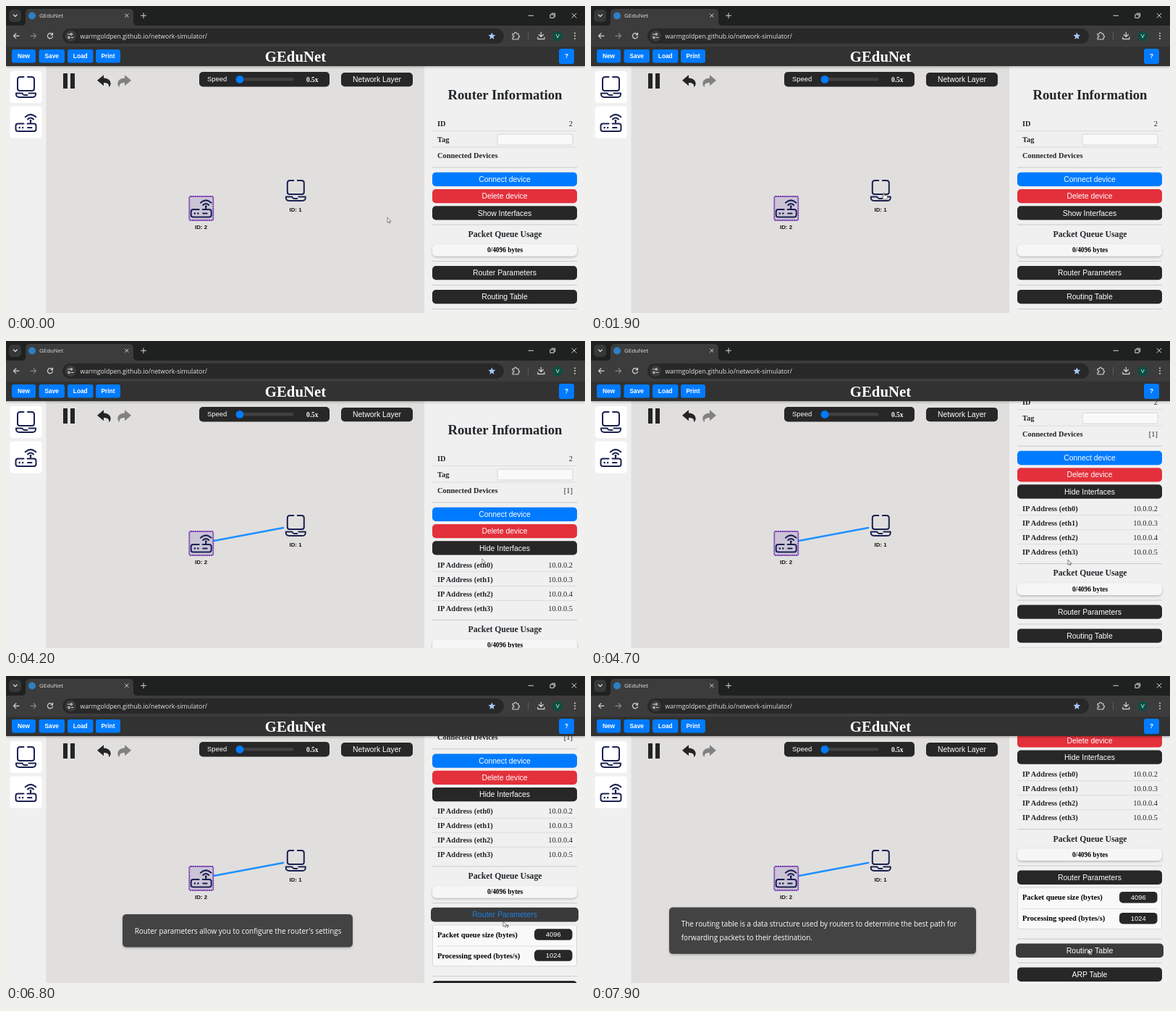
Animation of 800x424 px, one loop 8000 ms. Source, as an HTML page:

```html
<!DOCTYPE html>
<html lang="en">
<head>
<meta charset="utf-8">
<title>GEduNet</title>
<style>
  html, body { margin: 0; width: 100%; height: 100%; overflow: hidden; background: #e0dfde; }
  svg { display: block; width: 800px; height: 424px; }
  text { font-family: "Liberation Sans", Arial, sans-serif; }
  .serif { font-family: "Liberation Serif", "Times New Roman", serif; }
  .ui { font-family: "Open Sans", "Noto Sans", sans-serif; }
  .bold { font-weight: bold; }
  .line { fill: none; stroke-linecap: round; stroke-linejoin: round; }
  .btn { transform-box: fill-box; transform-origin: center; }
  .btn.hover { transform: scale(1.02); }
  .btn.hover rect { fill: #3a3a3a; }
  .blue text, text.blue { fill: #1e80e0; }
  #connect.hover { transform: none; }
  #connect.hover rect { fill: #006ae0; }
</style>
</head>
<body>
<svg id="stage" viewBox="0 0 800 424"></svg>
<script>
const DARK = '#272727', BLUE = '#007bff', NAVY = '#1a2150', INK = '#212529';
const LOOP = 8000;

const rect = (x, y, w, h, r, fill, extra = '') =>
  `<rect x="${x}" y="${y}" width="${w}" height="${h}" rx="${r}" fill="${fill}" ${extra}/>`;
const text = (x, y, s, size, fill = INK, cls = '', anchor = 'start', extra = '') =>
  `<text x="${x}" y="${y}" font-size="${size}" fill="${fill}" class="${cls}" text-anchor="${anchor}" ${extra}>${s}</text>`;
const line = (d, color, width = 1.2, extra = '') =>
  `<path class="line" d="${d}" stroke="${color}" stroke-width="${width}" ${extra}/>`;
const group = (id, content, extra = '') => `<g id="${id}" ${extra}>${content}</g>`;
const use = (id, x, y) => `<use href="#${id}" x="${x}" y="${y}"/>`;
const hr = (y, color = '#cbcbcb') => rect(589, y, 200, 1, 0, color);
const button = (id, y, label, fill = DARK) => group(id,
  rect(589, y, 200, 19.3, 5, fill) + text(689, y + 13.3, label, 10.42, '#fff', '', 'middle'), 'class="btn"');
const row = (y, key, value, id = '') =>
  text(596, y, key, 10.42, INK, 'serif bold', 'start', id && `id="${id}"`) +
  text(783, y, value, 10.42, INK, 'serif', 'end');

const defs = `<defs>
  <filter id="shadow" x="-10%" y="-30%" width="120%" height="180%">
    <feDropShadow dx="0" dy="1.5" stdDeviation="1.5" flood-opacity=".25"/></filter>
  <g id="laptop">${line('M-3 -14H-8Q-11.5 -14 -11.5 -10.5V2Q-11.5 5 -8.5 5H8.5Q11.5 5 11.5 2V-10.5Q11.5 -14 8 -14H2.5', NAVY, 2)
    + line('M4 8.5H13.5Q14 14 9 14H-9Q-14 14 -13.5 8.5H-5Q-4 11 -1.5 11H2', NAVY, 2)}</g>
  <g id="router">${line('M-3 1.5H-11Q-14 1.5 -14 4.5V9Q-14 12 -11 12H11Q14 12 14 9V4.5Q14 1.5 11 1.5H2M6.5 -3V1.5M2.5 -4.5Q6.5 -8.5 10.5 -4.5M-.8 -7.7Q6.5 -14.5 13.8 -7.7M2.5 7H8', NAVY, 2)
    + `<g fill="${NAVY}"><circle cx="-8.8" cy="7" r="1.3"/><circle cx="-4.4" cy="7" r="1.3"/><circle cx="6.5" cy="-2.5" r="1.4"/></g>`}</g>
  <path id="undo" fill="#242424" d="M126 102.7 135 95.3V99.4C141.3 99.4 144.7 103 144.7 107.6Q144.7 110.5 142 112.3C143 108 140.5 106 135 106V110.2Z"/>
</defs>`;

const tool = '#d5d5d5';
const browser = rect(0, 0, 800, 28, 0, '#1f2020') + rect(0, 27, 800, 29, 0, '#3c3c3c')
  + rect(4, 5, 17, 17, 5, '#363737') + line('M10.3 12 12.8 14.5 15.3 12', tool)
  + '<path fill="#3c3c3c" d="M22 27Q27 27 27 22V10Q27 4 33 4H170Q176 4 176 10V22Q176 27 181 27Z"/>'
  + '<circle cx="36" cy="13.5" r="5" fill="#2f7fc4"/>'
  + text(46, 16.3, 'GEduNet', 7.9, '#e4e4e4', 'ui')
  + line('M164.5 11 169 15.5M169 11 164.5 15.5M186.5 13.3H193.5M190 9.8V16.8', tool, 1)
  + line('M722 13.3H728.5M752.3 11.8H757V16.4H752.3ZM754 10.2H758.6V14.8M782 10.2 788 16.2M788 10.2 782 16.2', '#eee', .9)
  + line('M18 41.3H10.5M13.8 38 10.5 41.3 13.8 44.6', tool)
  + line('M34 41.3H41.5M38.2 38 41.5 41.3 38.2 44.6', '#888')
  + line('M64 39.2A3.6 3.6 0 1 0 64.5 42.2M64.5 37.4V39.8H62', tool)
  + rect(78, 31, 610, 21, 10.5, '#282828')
  + '<circle cx="89.3" cy="41.3" r="7.6" fill="#3c3c3c"/>'
  + line('M85.5 39H88M91.5 39A1.2 1.2 0 1 0 91.5 39.1M85.8 43.5A1.2 1.2 0 1 0 85.8 43.4M90.2 43.5H93', tool, 1.1)
  + text(102.5, 44.5, 'warmgoldpen.github.io/network-simulator/', 8.7, '#e4e4e4', 'ui')
  + '<path fill="#a8c7fa" d="M671.3 36.5 672.7 39.8 676.2 40.1 673.5 42.4 674.3 45.9 671.3 44 668.3 45.9 669.1 42.4 666.4 40.1 669.9 39.8Z"/>'
  + line('M700 38.3H702.5Q702.7 36.3 704 36.3T705.5 38.3H708V41Q709.6 41.2 709.6 42.3T708 43.6V46H700V43.3Q702 43.3 702 42T700 40.8Z', tool, 1.1)
  + rect(721, 36, 1, 11, 0, '#5b5b5b')
  + line('M739.3 36.3V42M736.3 39.5 739.3 42.5 742.3 39.5M734.8 43V45.7H743.8V43', tool)
  + '<circle cx="762.3" cy="41.8" r="6.8" fill="#0b4f43"/>' + text(762.3, 44.4, 'V', 7.5, '#fff', '', 'middle')
  + [37.5, 41.3, 45.1].map(y => `<circle cx="786" cy="${y}" r="1" fill="${tool}"/>`).join('');

const header = rect(0, 56, 800, 27, 0, '#303030', 'filter="url(#shadow)"')
  + [[8, 33, 'New'], [45.5, 35.5, 'Save'], [85, 35.5, 'Load'], [124, 34, 'Print'], [764, 21, '?']].map(([x, w, s]) =>
      rect(x, s === '?' ? 59 : 60, w, s === '?' ? 21 : 18.5, 3, BLUE)
      + text(x + w / 2, 72.2, s, 8.33, '#fff', 'bold', 'middle')).join('')
  + text(400, 76.6, 'GEduNet', 20.83, '#fff', 'serif bold', 'middle');

const board = rect(0, 83, 578, 341, 0, '#e0dfde') + rect(0, 83, 55.5, 341, 0, '#f0f0f0')
  + rect(5.5, 90, 44, 44, 4, '#fff') + use('laptop', 27.5, 112)
  + rect(5.5, 138.5, 44, 44, 4, '#fff') + use('router', 27.5, 161)
  + rect(79, 93, 6, 21, .5, '#242424') + rect(89, 93, 6, 21, .5, '#242424')
  + '<use href="#undo"/><use href="#undo" transform="translate(299) scale(-1 1)" opacity=".5"/>'
  + rect(267, 91, 180, 20.5, 5, DARK) + text(278, 104.4, 'Speed', 9.4, '#fff')
  + rect(318, 99, 79.5, 4.5, 2.2, '#404040') + `<circle cx="323" cy="101.4" r="5.4" fill="${BLUE}"/>`
  + text(415, 104.6, '0.5x', 9.4, '#fff', 'serif bold')
  + rect(463, 92, 99, 19.3, 5, DARK) + text(512.5, 105.2, 'Network Layer', 10.42, '#fff', '', 'middle')
  + line('M287 276 383 258', '#1e90ff', 2.6, 'id="link"')
  + rect(253.3, 263, 33, 33, 1.5, '#cbc4d6', 'stroke="#7a3fb2" stroke-width="1.8" stroke-dasharray="2.4 .5"')
  + use('router', 269.7, 279.5) + text(269.5, 308, 'ID: 2', 7.85, '#111', 'bold', 'middle')
  + use('laptop', 400.3, 255) + text(400, 284, 'ID: 1', 7.85, '#111', 'bold', 'middle');

const value = (y, s) => rect(730, y, 52.5, 15.5, 5, DARK) + text(756.3, y + 11.1, s, 9.4, '#fff', '', 'middle');
const interfaces = [0, 1, 2, 3].map(i =>
  row(312.5 + 20 * i, `IP Address (eth${i})`, `10.0.0.${i + 2}`, 'eth' + i)
  + (i < 3 ? hr(318 + 20 * i, '#dcdcdc') : '')).join('');
const params = rect(589.5, 382.8, 199, 57, 3, '#f9f9f9', 'stroke="#d8d8d8"')
  + text(596, 399.8, 'Packet queue size (bytes)', 10.42, '#000', 'serif bold') + value(388.3, '4096')
  + rect(596, 411.5, 187, 1, 0, '#dcdcdc')
  + text(596, 428.8, 'Processing speed (bytes/s)', 10.42, '#000', 'serif bold') + value(417.3, '1024');

// The panel content is stacked; lower parts slide down when sections open.
const panel = rect(578, 83, 222, 341, 0, '#f0f0f0') + group('scroll',
  text(689.5, 129, 'Router Information', 18.7, INK, 'serif bold', 'middle')
  + row(166, 'ID', '2') + hr(172, '#dcdcdc')
  + row(188, 'Tag', '') + rect(679, 177, 104, 15, 2, '#f9f9f9', 'stroke="#cfcfcf" stroke-width=".8"') + hr(194.5, '#dcdcdc')
  + row(210, 'Connected Devices', '<tspan id="peer">[1]</tspan>') + hr(222.5)
  + button('connect', 229.7, 'Connect device', BLUE)
  + button('delete', 253, 'Delete device', '#e3303b')
  + button('toggle', 276.2, 'Show Interfaces')
  + group('interfaces', interfaces)
  + group('lower', hr(301.5)
    + text(689.5, 319, 'Packet Queue Usage', 11.7, INK, 'serif bold', 'middle')
    + rect(589, 329, 200, 16.5, 6, '#f6f6f6', 'filter="url(#shadow)"')
    + text(689.5, 340.2, '0/4096 bytes', 9.4, '#000', 'serif bold', 'middle')
    + hr(352) + button('settings', 359, 'Router Parameters')
    + group('params', params)
    + group('lowest', hr(385) + button('routing', 392, 'Routing Table')
      + hr(418) + button('arp', 425, 'ARP Table'))));

const tip = (id, width, lines) => {
  const h = 45.5 + 18.8 * (lines.length - 1), top = 351.7 - h / 2;
  return group(id, rect(320 - width / 2, top, width, h, 5, '#323232', 'fill-opacity=".87" filter="url(#shadow)"')
    + lines.map((s, i) => text(336.7 - width / 2, top + 26.7 + 18.8 * i, s, 9.89, '#fff', 'ui')).join(''));
};
const tips = tip('tipAddress', 424, [
    'The IP (Internet Protocol) address is a unique identifier assigned to a device on a',
    'network. It allows devices to communicate with each other over the network. IPv4',
    'addresses are 32-bit numbers, while IPv6 addresses are 128-bit numbers.'])
  + tip('tipParams', 318, ["Router parameters allow you to configure the router's settings"])
  + tip('tipRouting', 424, [
    'The routing table is a data structure used by routers to determine the best path for',
    'forwarding packets to their destination.']);

const outline = 'fill="#fff" stroke="#333" stroke-width=".6"';
const cursor = group('cursor',
  group('arrow', `<path ${outline} d="M0 0V7.2L1.7 5.7 2.8 8 3.9 7.5 2.9 5.2H5Z"/>`)
  + group('help', text(4.2, 8.8, '?', 6, '#111', 'bold'))
  + group('hand', `<path ${outline} d="M0 .5Q.8-.4 1.5.5V3.5L5 4.2Q5.8 4.5 5.6 5.5L4.8 9H.8L-1.8 5.8Q-1.5 4.8 0 5.6Z"/>`));

document.getElementById('stage').innerHTML = defs + board + panel + header + browser + tips + cursor;

const $ = id => document.getElementById(id);
const show = (id, on) => $(id).setAttribute('display', on ? 'inline' : 'none');
const move = (id, x, y) => $(id).setAttribute('transform', `translate(${x} ${y})`);
const mark = (id, cls, on) => $(id).classList.toggle(cls, on);
const ease = p => p * p * (3 - 2 * p);

// Each key is [time, ...values]; returns the values at time t.
function track(keys, t, curve = p => p) {
  const i = keys.findIndex(k => k[0] > t);
  if (i < 0) return keys[keys.length - 1].slice(1);
  const a = keys[i - 1], b = keys[i], p = curve((t - a[0]) / (b[0] - a[0]));
  return a.slice(1).map((v, n) => v + (b[n + 1] - v) * p);
}

const pointerKeys = [
  [0, 527, 292], [200, 527, 292], [750, 690, 239], [1000, 690, 239], [1750, 404, 258], [2200, 404, 258],
  [3200, 638, 279], [3600, 638, 279], [4300, 659, 302], [4850, 659, 302], [5250, 656, 264], [5700, 656, 264],
  [6150, 687, 339], [6950, 687, 339], [7500, 687, 377]];
const scrollKeys = [
  [0, 0], [4350, 0], [4500, 50], [4700, 77.7], [4900, 105.5], [6700, 105.5], [6800, 122], [7000, 173.7]];

function draw(t) {
  const within = (a, b) => t >= a && t < b;
  const linked = t >= 2100, open = t >= 3500, expanded = t >= 6500;
  show('link', linked);
  show('peer', linked);
  show('interfaces', open);
  show('params', expanded);
  $('toggle').lastChild.textContent = open ? 'Hide Interfaces' : 'Show Interfaces';
  move('lower', 0, open ? 83.3 : 0);
  move('lowest', 0, expanded ? 68 : 0);
  move('scroll', 0, -track(scrollKeys, t)[0]);

  const onAddress = within(5250, 5850), onParams = within(6100, 6950), onRouting = t >= 7500;
  mark('connect', 'hover', within(700, 1050));
  mark('eth3', 'blue', onAddress);
  mark('settings', 'hover', onParams);
  mark('settings', 'blue', onParams);
  mark('routing', 'hover', onRouting);
  show('tipAddress', onAddress);
  show('tipParams', onParams);
  show('tipRouting', onRouting);

  const hand = within(650, 1100) || within(1700, 2250) || within(3100, 3700);
  show('hand', hand);
  show('arrow', !hand);
  show('help', onAddress || onParams || onRouting);
  move('cursor', ...track(pointerKeys, t, ease));
}

function tick() {
  draw(performance.now() % LOOP);
  requestAnimationFrame(tick);
}
tick();
</script>
</body>
</html>
```
